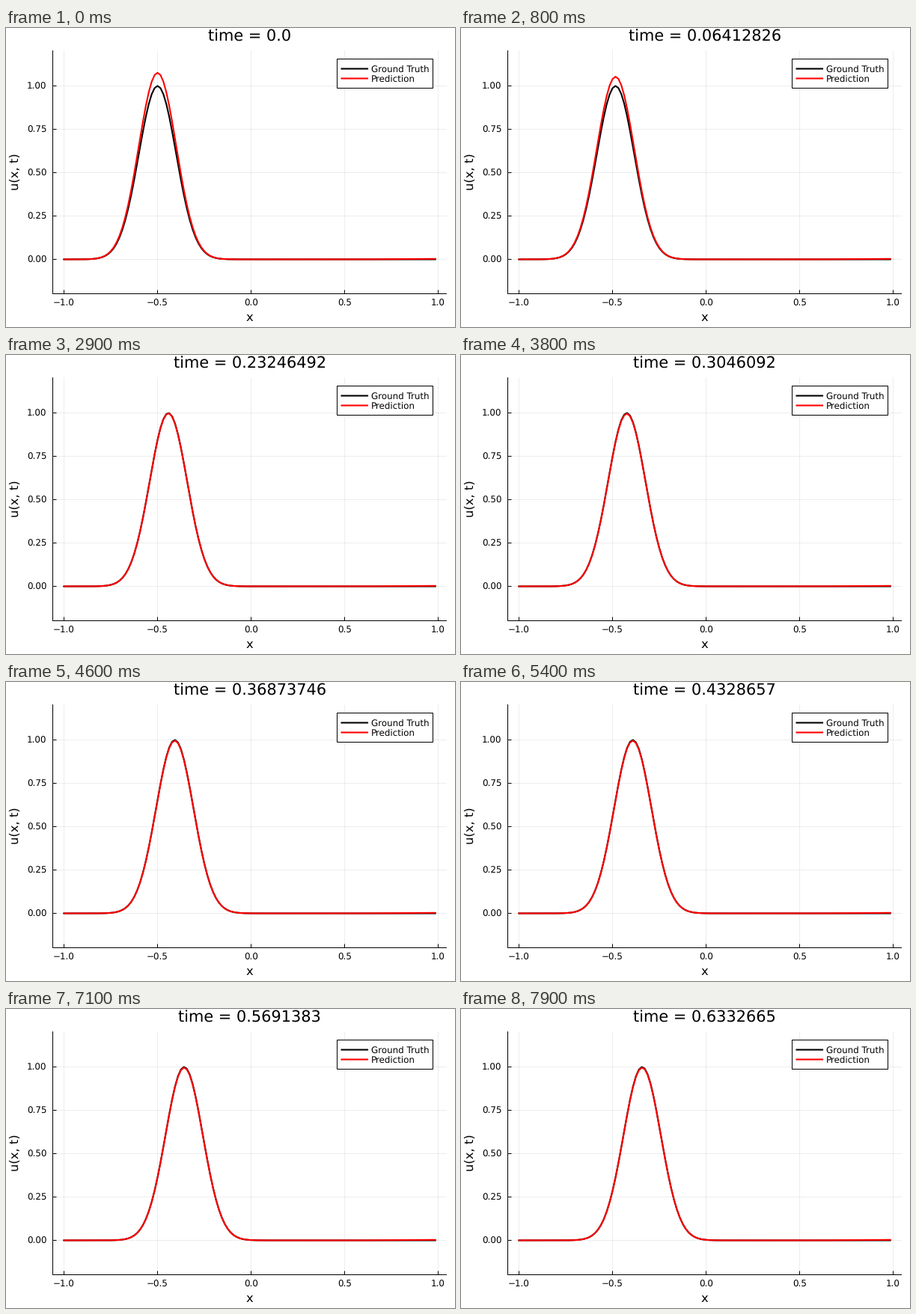
A matplotlib script that plays this animation: 600x400 px, repeating every 8000 ms.

```python
import numpy as np
import matplotlib.pyplot as plt
from matplotlib.animation import FuncAnimation
from matplotlib.patches import Rectangle

FRAMES, INTERVAL = 80, 100
DT = 0.0080160319          # model time per frame
SPEED, SIGMA = 0.25, 0.1
LEFT, RIGHT, TOP, BOTTOM = 62.5, 588.5, 30.5, 355.5
PT = 0.72                  # points per pixel at 100 dpi
TITLE, LABEL, TICK = 20.83, 16.37, 11.9

plt.rcParams["font.family"] = "DejaVu Sans"
plt.rcParams["text.hinting"] = "no_hinting"
plt.rcParams["path.snap"] = False
fig = plt.figure(figsize=(6, 4), dpi=100, facecolor="white")
ax = fig.add_axes([0, 0, 1, 1])
ax.set(xlim=(0, 600), ylim=(400, 0))
ax.axis("off")


def px(x):
    return 327.5 + 250 * x


def py(u):
    return 309.5 - 232 * u


def line(xs, ys, color="black", width=1.0, **kw):
    return ax.plot(xs, ys, color=color, lw=width * PT, **kw)[0]


def text(x, y, s, size, ha="center", **kw):
    return ax.text(x, y, s, fontsize=size * PT, ha=ha, va="baseline", **kw)


# grid, ticks and tick labels
for v in (-1, -0.5, 0, 0.5, 1):
    x = px(v)
    line([x, x], [TOP, BOTTOM], width=0.7, alpha=0.1)
    line([x, x], [BOTTOM, BOTTOM - 5], solid_capstyle="butt")
    text(x, 371.5, f"{v:.1f}".replace("-", "\u2212"), TICK)
for v in (0, 0.25, 0.5, 0.75, 1):
    y = py(v)
    line([LEFT, RIGHT], [y, y], width=0.7, alpha=0.1)
    line([LEFT, LEFT + 5], [y, y], solid_capstyle="butt")
    text(54.5, y + 4.3, f"{v:.2f}", TICK, ha="right")
line([LEFT, LEFT], [TOP, BOTTOM])
line([LEFT, RIGHT], [BOTTOM, BOTTOM])

title = text(325.8, 18, "", TITLE)
text(325.5, 391.5, "x", LABEL)
text(16.5, 192.5, "u(x, t)", LABEL, rotation=90, rotation_mode="anchor")

grid = -1 + np.arange(128) / 64
truth = line([], [], "black", 2.1)
guess = line([], [], "red", 2.1)

# legend
ax.add_patch(Rectangle((442.5, 41.5), 128, 39, fc="white", ec="black",
                       lw=PT, zorder=3))
for y, color, label in ((54.5, "black", "Ground Truth"),
                        (67.5, "red", "Prediction")):
    line([448.5, 483], [y, y], color, 2.1, zorder=4)
    text(488, y + 4.4, label, TICK, ha="left", zorder=4)


def update(i):
    t = i * DT
    wave = np.exp(-((grid + 0.5 - SPEED * t) / SIGMA) ** 2 / 2)
    gain = np.interp(t, [0, 0.136, 0.232, 0.3], [1.076, 1.028, 0.998, 0.996])
    drift = 0.003 * np.clip((grid - 0.6) / 0.35, 0, 1)
    truth.set_data(px(grid), py(wave))
    guess.set_data(px(grid), py(gain * wave + drift))
    title.set_text(f"time = {np.float32(t)!s}")
    return truth, guess, title


anim = FuncAnimation(fig, update, frames=FRAMES, interval=INTERVAL,
                     repeat=True, repeat_delay=0)
plt.show()
```
